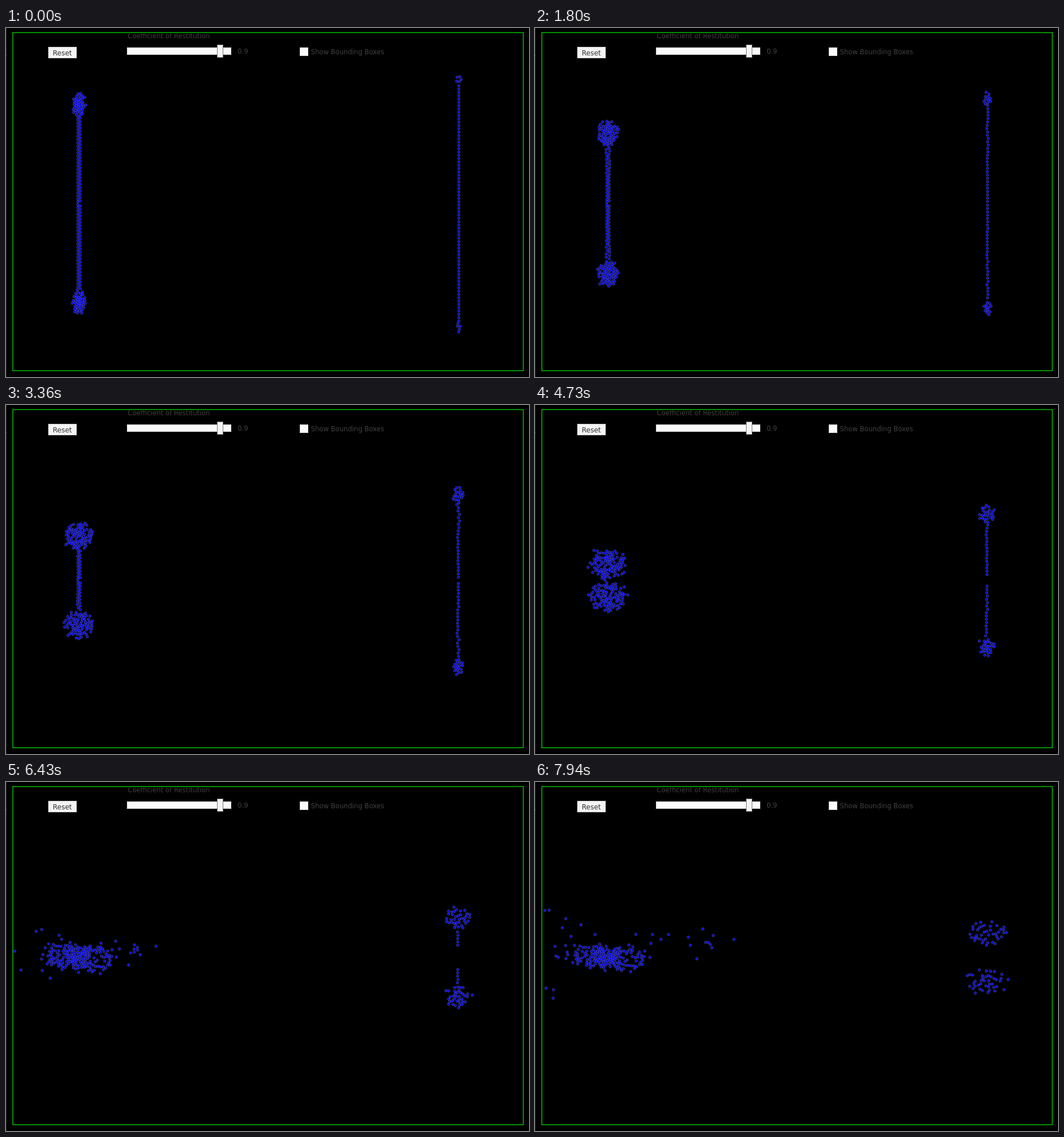
An HTML page with a canvas that plays this animation: 917x611 px, repeating every 7.99 s.

```html
<!DOCTYPE html>
<html lang="en">
<head>
<meta charset="utf-8">
<title>Particle collapse</title>
<style>
  html, body { margin: 0; width: 100%; height: 100%; overflow: hidden; background: #000; }
  svg, canvas { position: absolute; left: 0; top: 0; }
  text { font: 11.65px "DejaVu Sans", sans-serif; fill: #404040; }
</style>
</head>
<body>
<svg width="917" height="611">
  <clipPath id="below"><rect y="10" width="917" height="30"/></clipPath>
  <path d="M.5 0V611" stroke="#2a2a2a"/>
  <path d="M0 48.5H1" stroke="#777"/>
  <text x="213.5" y="18" clip-path="url(#below)">Coefficient of Restitution</text>
  <g fill="#fafafa" stroke="#ccc">
    <rect x="74.5" y="33.5" width="49" height="19" fill="#f4f4f4"/>
    <rect x="212.5" y="34.5" width="182" height="12"/>
    <rect x="370.5" y="29.5" width="10" height="22" fill="#f4f4f4" stroke="#777"/>
    <rect x="515.5" y="34.5" width="14" height="14"/>
  </g>
  <text x="82" y="48" style="font-size:12px;fill:#333">Reset</text>
  <text x="406" y="45">0.9</text>
  <text x="534.5" y="46">Show Bounding Boxes</text>
  <rect x="12" y="8" width="895" height="592" fill="none" stroke="#0e0" stroke-width="1.2"/>
</svg>
<canvas id="stage" width="917" height="611"></canvas>
<script>
const ctx = document.getElementById('stage').getContext('2d');
const LOOP = 7990, TICK = 66, MID = 307, SIZE = 4.8, WALL = 15;
const BURST = 5; // seconds until the left halves meet

let seed = 7;
const rand = () => (seed = seed * 16807 % 2147483647) / 2147483647 * 2 - 1;
const mix = (a, b, u) => a + (b - a) * u;
const clamp = u => Math.max(0, Math.min(1, u));

// Both ends of a column gather into clumps that fall towards the middle.
// edge: outer end of a clump, rx and ry: its radii, min: nearest clump distance,
// x: clump centre (side is -1 above, 1 below), drift: outward slide of the loose chain.
const columns = [{
  n: 93, gap: 2.9, width: 2.1, min: 3, flung: .18,
  edge: t => 192 - 26.5 * t - .0275 * t ** 4,
  rx: t => 9 + 4.8 * t,
  ry: t => 18 + 1.5 * Math.min(t, BURST) - 2 * Math.max(0, t - BURST),
  x: (t, side) => 128 + side * 22 * clamp((t - 4.7) / 1.7),
  drift: t => 0
}, {
  n: 41, gap: 5.8, width: 0, min: 42, flung: 0,
  edge: t => 226 - 15.5 * t - .95 * t * t,
  rx: t => 3 * Math.exp(.3 * t),
  ry: t => 9 + 1.5 * t,
  x: t => 794 - .3 * t,
  drift: t => .07 * t ** 3
}];

for (const col of columns) {
  col.dots = [];
  for (const side of [-1, 1])
    for (let k = 0; k < col.n; k++) {
      const angle = k * 2.4 + side + rand() * .3, dir = Math.sign(Math.cos(angle));
      const dot = { side, k, angle, jr: rand() * rand() * .3, jx: rand(), vx: 0, vy: 0 };
      if (Math.abs(rand()) < col.flung) {
        dot.vx = dir * (30 + 25 * rand());
        dot.vy = dir < 0 ? 25 * rand() : 10 * rand() - 12;
      }
      col.dots.push(dot);
    }
}

function place(col, p, t) {
  const rx = col.rx(t), ry = col.ry(t), c = Math.max(col.min, col.edge(t) - ry);
  const start = (col.n - p.k - .5) * col.gap, loose = start + col.drift(t);
  const age = clamp(t / 4);

  const joined = Math.max(1, Math.min(col.n, col.n - (c - ry) / col.gap));
  const r = Math.min(1, Math.sqrt((p.k + .5) / joined)) + p.jr;
  let w = clamp((loose - c + ry * 1.3) / (ry * .8));
  w *= w * (3 - 2 * w);

  const zigzag = (p.k % 2 ? 1 : -1) * col.width * (1 - age * .7 * Math.exp(-start / 20));
  const wobble = p.jx * age * 3 * clamp(start / 100);
  const x = mix(zigzag + wobble, rx * r * Math.cos(p.angle), w);
  const d = mix(loose, c + ry * r * Math.sin(p.angle), w);
  const flight = Math.max(0, t - BURST);
  return {
    x: col.x(t, p.side) + x + p.vx * flight,
    y: MID + p.side * d + p.vy * flight
  };
}

// Push overlapping dots apart.
function separate(pts) {
  for (let pass = 0; pass < 5; pass++)
    for (let i = 0; i < pts.length; i++)
      for (let j = 0; j < i; j++) {
        const a = pts[i], b = pts[j], dx = a.x - b.x, dy = a.y - b.y;
        const dist = Math.hypot(dx, dy);
        if (dist >= SIZE || !dist) continue;
        const push = (SIZE - dist) / dist * .4;
        a.x += dx * push; a.y += dy * push;
        b.x -= dx * push; b.y -= dy * push;
      }
}

function draw(t) {
  ctx.clearRect(0, 0, 917, 611);
  ctx.fillStyle = '#00f';
  ctx.strokeStyle = '#777';
  ctx.lineWidth = .5;
  for (const col of columns) {
    const pts = col.dots.map(p => place(col, p, t));
    for (const p of pts) if (p.x < WALL) p.x = mix(WALL, p.x, -.3);
    separate(pts);
    for (const { x, y } of pts) {
      ctx.beginPath();
      ctx.arc(Math.max(WALL, x), y, 2.2, 0, 7);
      ctx.fill();
      ctx.stroke();
    }
  }
}

function frame() {
  const t = performance.now() % LOOP;
  draw(Math.floor(t / TICK) * TICK / 1000);
  requestAnimationFrame(frame);
}
frame();
</script>
</body>
</html>
```
